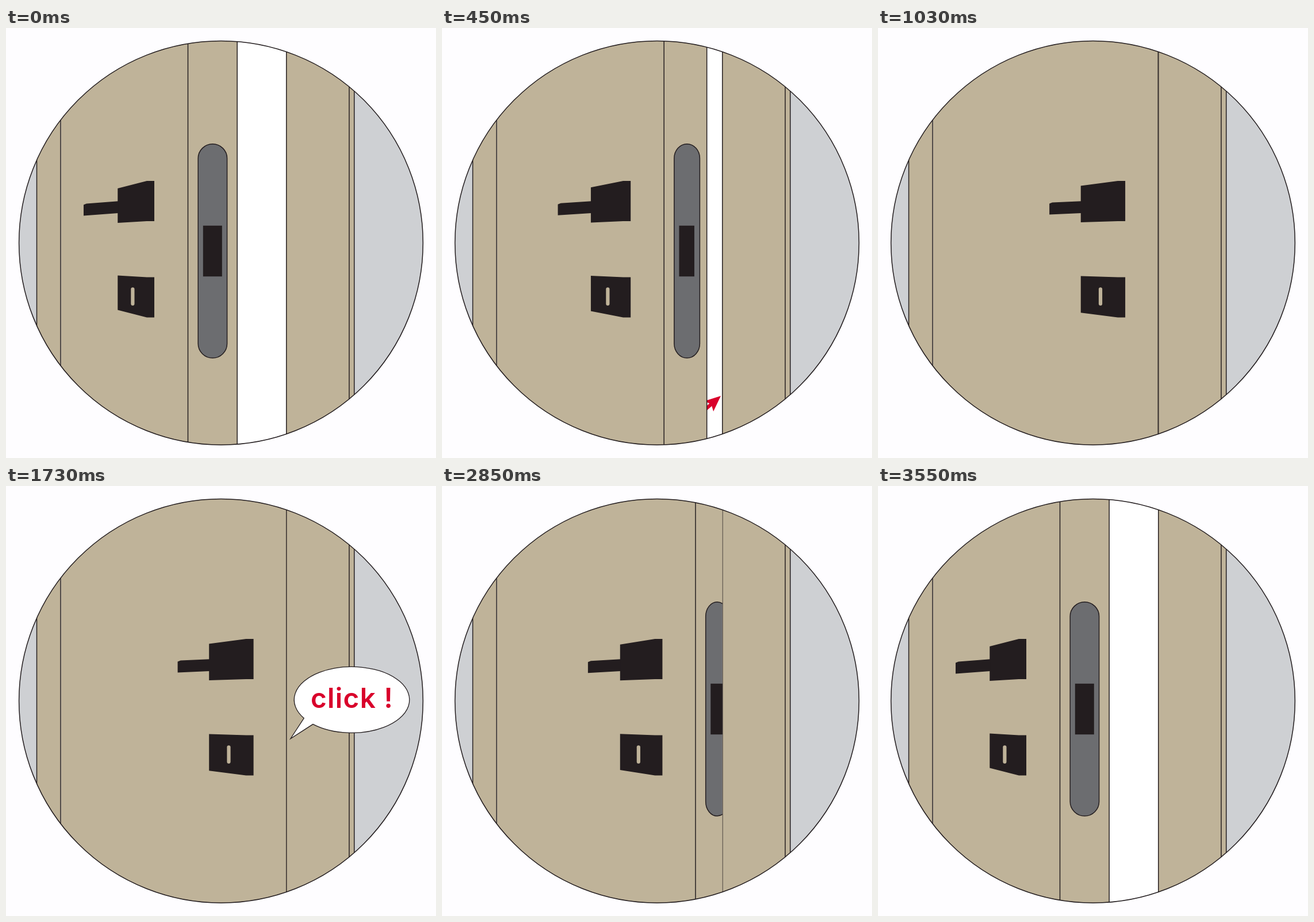
An HTML page with a canvas that plays this animation: 748 px wide and 748 px high, repeating every 3970 ms.

```html
<!DOCTYPE html>
<html lang="en">
<head>
<meta charset="utf-8">
<title>Door closing</title>
<style>
  html, body { margin: 0; width: 100%; height: 100%; overflow: hidden; background: #fefdff; }
  canvas { display: block; width: 748px; height: 748px; }
</style>
</head>
<body>
<canvas id="stage" width="748" height="748"></canvas>
<script>
const ctx = document.getElementById('stage').getContext('2d');
const SIZE = 748, LOOP = 3970, LAST_STEP = 106;
const PAPER = '#fefdff', WOOD = '#bfb399', WALL = '#ced0d3', STEEL = '#6c6d70';
const INK = '#231d1f', RED = '#d9002b';
const WALL_LEFT = 53.5, HINGE = 95, JAMB = 487.8, TRIM = 597, WALL_RIGHT = 605.8;

const clamp = v => Math.max(0, Math.min(1, v));
const mix = (a, b, t) => a + (b - a) * t;
const span = (a, b, v) => clamp((v - a) / (b - a));
const smooth = t => t * t * (3 - 2 * t);

// Steps last 30 ms; every tenth one is held a little longer.
const stepStart = k => 30 * k + 10 * Math.round(10 * Math.floor((k + 5) / 10) / 3);
function stepAt(ms) {
  let k = Math.min(LAST_STEP, Math.floor(ms / 30));
  while (k > 0 && stepStart(k) > ms) k--;
  return k;
}

function band(x0, x1, color) {
  ctx.fillStyle = color;
  ctx.fillRect(x0, 0, x1 - x0, SIZE);
}

function vline(x) {
  ctx.beginPath();
  ctx.moveTo(x, 0);
  ctx.lineTo(x, SIZE);
  ctx.stroke();
}

function polygon(points, color) {
  ctx.beginPath();
  points.forEach(([x, y]) => ctx.lineTo(x, y));
  ctx.closePath();
  ctx.fillStyle = color;
  ctx.fill();
}

// Box seen from the side: flat back against the door, larger front to the left.
function drawFitting(p, hasLever) {
  const back = mix(258, 430.6, p), rim = back - 13;
  const front = mix(194.3, 353.2, p), top = mix(279, 274.4, p), bottom = mix(339, 338, p);
  polygon([[front, top], [rim, 266], [back, 266], [back, 336], [rim, 336], [front, bottom]], INK);
  if (!hasLever) return;
  const tip = mix(135, 298.6, p), drop = mix(4.6, 2.6, p);
  polygon([
    [front + 1, 301.3], [tip + 5, 301 + drop], [tip, 303 + drop],
    [tip, 322 + drop], [front + 1, 322]
  ], INK);
}

// The lock is the handle's box mirrored downwards, with a key slot.
function drawLock(p) {
  ctx.save();
  ctx.translate(0, 769.6);
  ctx.scale(1, -1);
  drawFitting(p, false);
  ctx.restore();
  ctx.beginPath();
  ctx.roundRect(mix(217.3, 384.4, p), 451.2, 6.2, 31.6, 3.1);
  ctx.fillStyle = WOOD;
  ctx.fill();
}

function drawLatchPlate(front, p) {
  const rx = mix(25.2, 18, p), cx = front + 17.7 + rx;
  ctx.beginPath();
  ctx.ellipse(cx, 226.8, rx, 25, 0, Math.PI, 2 * Math.PI);
  ctx.ellipse(cx, 549, rx, 25, 0, 0, Math.PI);
  ctx.closePath();
  ctx.fillStyle = STEEL;
  ctx.fill();
  ctx.stroke();
  ctx.fillStyle = INK;
  ctx.fillRect(front + 26.3, 343.8, mix(33, 17, p), 88.4);
}

function drawDoor(p) {
  const front = mix(316.5, JAMB, p), edge = mix(402.2, 546, p);
  ctx.save();
  ctx.beginPath();
  ctx.rect(HINGE + 1, 0, JAMB - HINGE - 1, SIZE);
  ctx.clip();
  band(HINGE, edge, WOOD);
  vline(front);
  vline(edge);
  drawLatchPlate(front, p);
  ctx.restore();
  drawFitting(p, true);
  drawLock(p);
}

// Swift arrow that slips out from behind the door edge.
function drawArrow(k) {
  if (k < 14 || k > 23) return;
  const reach = 280 * Math.sin(span(14, 16, k) * Math.PI / 2);
  const tail = mix(-40, 250, smooth(span(17, 24, k)));
  ctx.save();
  ctx.translate(485, 640);
  ctx.rotate(-41 * Math.PI / 180);
  ctx.fillStyle = RED;
  ctx.fillRect(tail, -3, reach - 20 - tail, 6);
  polygon([[reach, 0], [reach - 27.5, -12], [reach - 22, 0], [reach - 27.5, 12]], RED);
  ctx.restore();
}

// Linear growth, then a damped overshoot.
function bubbleScale(k) {
  if (k < 38) return span(32, 38, k);
  const t = (k - 38) / 30;
  return 1 + 0.15 * Math.sin(4 * Math.PI * t) * Math.exp(-5 * t);
}

function drawBubble(k) {
  const scale = bubbleScale(k), alpha = 1 - span(74, 80, k);
  if (scale <= 0 || alpha <= 0) return;
  const tipX = 495, tipY = 439.5;
  ctx.save();
  ctx.globalAlpha = alpha;
  ctx.translate(tipX, tipY);
  ctx.scale(scale, scale);
  ctx.translate(-tipX, -tipY);
  ctx.beginPath();
  ctx.ellipse(602.2, 371.5, 100.9, 57.8, 0, 2.55, 2.31 + 2 * Math.PI);
  ctx.lineTo(tipX, tipY);
  ctx.closePath();
  ctx.fillStyle = '#fff';
  ctx.fill();
  ctx.lineWidth = 1.3;
  ctx.stroke();
  ctx.fillStyle = RED;
  ctx.font = '600 48px Inter, sans-serif';
  ctx.letterSpacing = '1.3px';
  ctx.textAlign = 'center';
  ctx.fillText('click !', 602.6, 386);
  ctx.restore();
}

function outline() {
  ctx.beginPath();
  ctx.arc(374, 373.8, 351.4, 0, 2 * Math.PI);
}

function draw(k) {
  const closed = smooth(span(0, 32, k)) - smooth(span(74, 106, k));
  band(0, SIZE, PAPER);
  ctx.strokeStyle = INK;
  ctx.lineWidth = 1.5;

  ctx.save();
  outline();
  ctx.clip();
  band(0, SIZE, WOOD);
  band(0, WALL_LEFT, WALL);
  band(WALL_RIGHT, SIZE, WALL);
  band(HINGE, JAMB, '#fff');
  [WALL_LEFT, HINGE, JAMB, TRIM, WALL_RIGHT].forEach(vline);
  drawArrow(k);
  drawDoor(closed);
  ctx.restore();

  outline();
  ctx.stroke();
  drawBubble(k);
}

const begin = performance.now();
function tick() {
  draw(stepAt((performance.now() - begin) % LOOP));
  requestAnimationFrame(tick);
}
tick();
</script>
</body>
</html>
```
